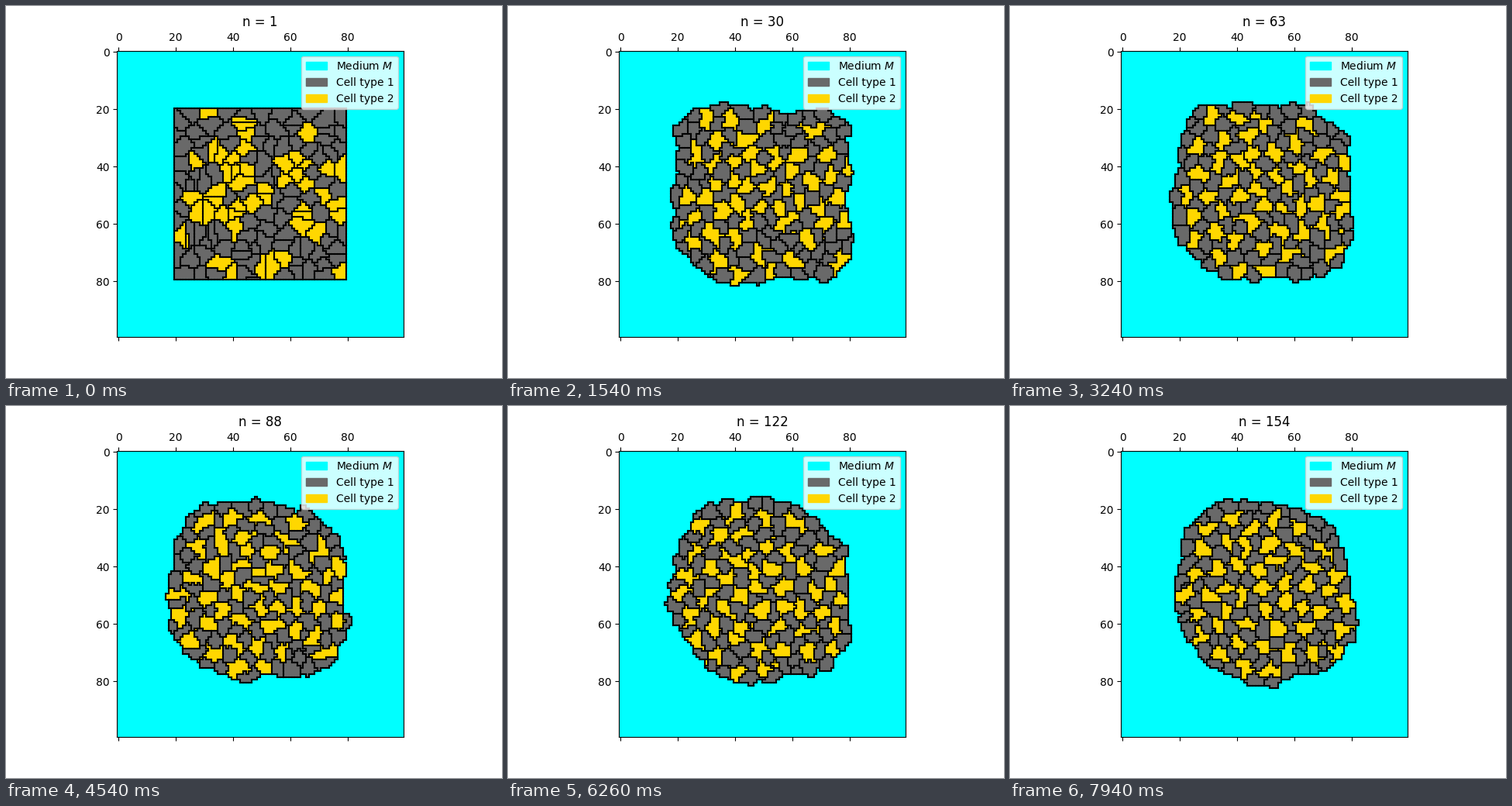
A matplotlib script that plays this animation: 640 px wide and 480 px high, repeating every 8000 ms.

```python
import numpy as np
import matplotlib.pyplot as plt
from matplotlib.animation import FuncAnimation
from matplotlib.colors import ListedColormap
from matplotlib.patches import Patch

# Cellular Potts model: two cell types that prefer each other's company
SIZE, STEPS, SWEEPS = 100, 154, 3
TEMP, STIFF, AREA = 8.0, 0.25, 36
J = np.array([[0, 12, 12],
              [12, 10, 6],
              [12, 6, 10]])
DY = np.array([0, 0, 1, -1, 1, 1, -1, -1])
DX = np.array([1, -1, 0, 0, 1, -1, 1, -1])
NAMES = ["Medium $M$", "Cell type 1", "Cell type 2"]
COLORS = ["cyan", "dimgray", "gold"]

# Middles of the patches that start out as type 2
PATCHES = np.array([
    (32, 21), (23, 28), (35, 29), (42, 25), (52, 24), (45, 31), (34, 35),
    (41, 40), (27, 38), (51, 42), (49, 49), (42, 45), (32, 50), (24, 52),
    (22, 60), (40, 56), (31, 55), (22, 65), (39, 61), (65, 56), (69, 62),
    (62, 61), (54, 66), (51, 72), (60, 71), (58, 40), (62, 36), (66, 26),
    (78, 37), (72, 41), (63, 41), (66, 48), (56, 47), (72, 53), (77, 57),
    (73, 71), (76, 76), (47, 77), (39, 76), (54, 77), (33, 74), (45, 55)])

rng = np.random.default_rng(12)


def manhattan(a, b):
    return np.abs(a[:, None] - b[None]).sum(-1)


def start():
    """Square of 60 x 60 sites split among jittered seeds."""
    mid = np.arange(22.0, 80, 5)
    seeds = np.stack(np.meshgrid(mid, mid), -1).reshape(-1, 2)
    seeds += rng.uniform(-2.7, 2.7, seeds.shape)
    y, x = np.mgrid[20:80, 20:80]
    sites = np.column_stack([x.ravel(), y.ravel()])
    grid = np.zeros((SIZE, SIZE), int)
    grid[20:80, 20:80] = manhattan(sites, seeds).argmin(1).reshape(60, 60) + 1
    gold = manhattan(seeds, PATCHES).min(1) < 4
    return grid, np.concatenate([[0], 1 + gold])


def contact(cell, around, kind):
    bond = J[kind[cell][:, None], kind[around]]
    return (bond * (cell[:, None] != around)).sum(1)


def sweep(grid, kind):
    """Try one copy from a random neighbour at every site."""
    for k in rng.permutation(9):
        r, c = divmod(k, 3)
        y, x = np.mgrid[5 + r:95:3, 5 + c:95:3].reshape(2, -1)
        d = rng.integers(0, 4, y.size)
        old, new = grid[y, x], grid[y + DY[d], x + DX[d]]
        edge = old != new
        y, x, old, new = y[edge], x[edge], old[edge], new[edge]
        around = grid[y[:, None] + DY, x[:, None] + DX]
        excess = np.bincount(grid.ravel(), minlength=kind.size) - AREA
        cost = contact(new, around, kind) - contact(old, around, kind)
        cost = cost + STIFF * ((old > 0) * (1 - 2 * excess[old])
                               + (new > 0) * (1 + 2 * excess[new]))
        ok = rng.random(y.size) < np.exp(-np.maximum(cost, 0) / TEMP)
        grid[y[ok], x[ok]] = new[ok]


def borders(grid):
    """Unit segments between different cells, parted by NaN."""
    y, x = np.nonzero(grid[:, 1:] != grid[:, :-1])
    v, u = np.nonzero(grid[1:] != grid[:-1])
    gap, gap2 = np.full(x.size, np.nan), np.full(u.size, np.nan)
    xs = np.concatenate([np.column_stack([x + .5, x + .5, gap]).ravel(),
                         np.column_stack([u - .5, u + .5, gap2]).ravel()])
    ys = np.concatenate([np.column_stack([y - .5, y + .5, gap]).ravel(),
                         np.column_stack([v + .5, v + .5, gap2]).ravel()])
    return xs, ys


grid, kind = start()
states = []
for _ in range(STEPS):
    states.append((kind[grid], borders(grid)))
    for _ in range(SWEEPS):
        sweep(grid, kind)

fig, ax = plt.subplots(figsize=(6.4, 4.8), dpi=100)
image = ax.matshow(states[0][0], cmap=ListedColormap(COLORS), vmin=0, vmax=2)
ax.autoscale(False)
line, = ax.plot([], [], color="black", lw=1.5, snap=True)
title = ax.set_title("n = 1")
ax.legend(handles=[Patch(color=c, label=s) for c, s in zip(COLORS, NAMES)],
          loc="upper right")

# Five steps share 13 ticks of 20 ms: short, long, short, long, short
ONSETS = [0, 1, 6, 7, 12]


def update(tick):
    cycle, rest = divmod(tick, 13)
    step = 5 * cycle + np.searchsorted(ONSETS, rest, side="right") - 1
    kinds, edges = states[step]
    image.set_data(kinds)
    line.set_data(*edges)
    title.set_text(f"n = {step + 1}")
    return image, line, title


anim = FuncAnimation(fig, update, frames=400, interval=20, repeat=True,
                     repeat_delay=0, blit=False)
plt.show()
```
